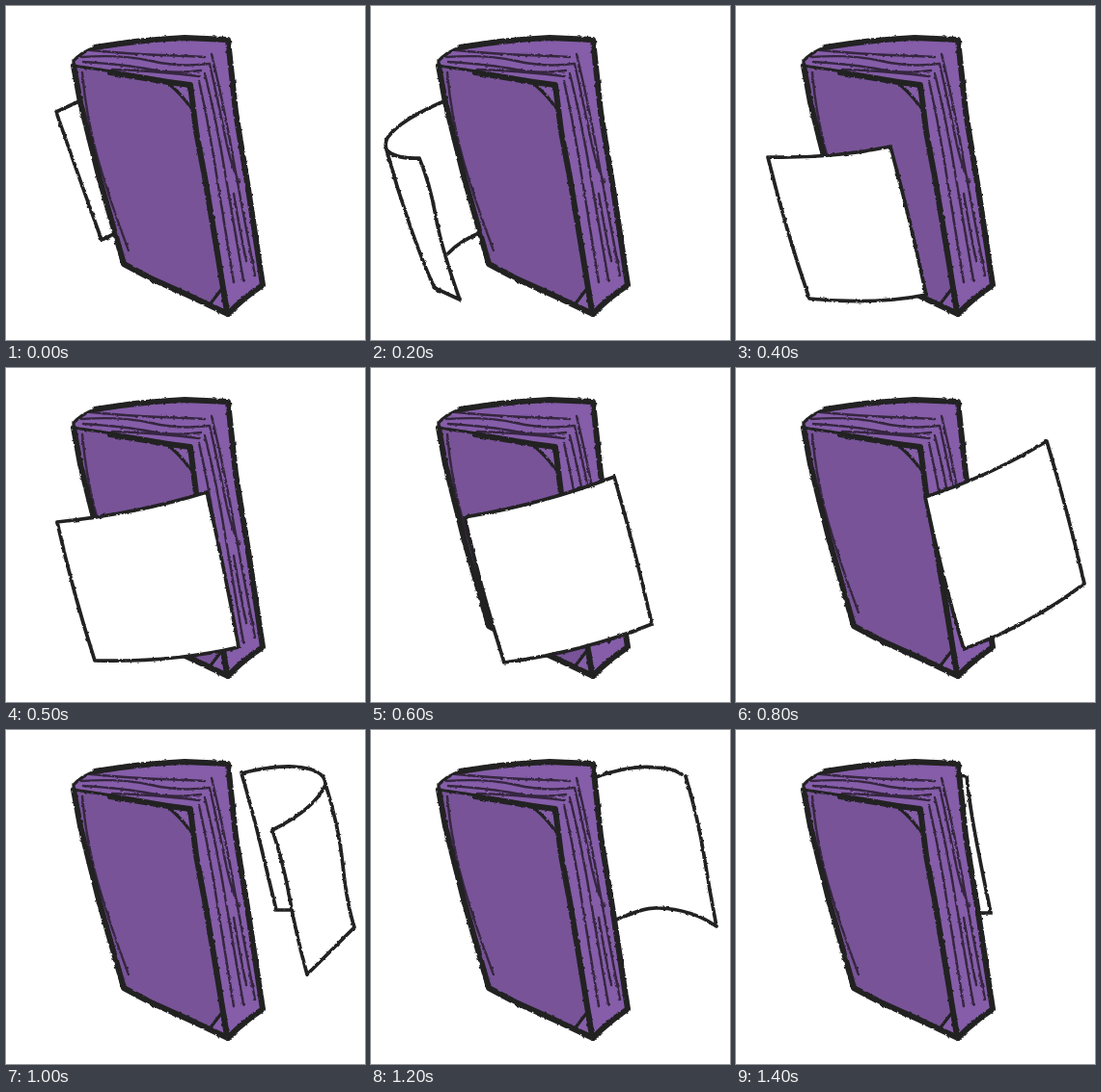
Animation, 372 px wide and 347 px high, one loop 1500 ms. Source, as an HTML page:

```html
<!DOCTYPE html>
<html lang="en">
<head>
<meta charset="utf-8">
<title>Page around a book</title>
<style>
  html, body { margin: 0; width: 100%; height: 100%; overflow: hidden; background: #fff; }
  svg { display: block; width: 372px; height: 347px; }
  path { stroke: #222; stroke-linecap: round; stroke-linejoin: round; fill: none; }
  .side { fill: #855da9; stroke: none; }
  .cover { fill: #785398; stroke: none; }
  .bold { stroke-width: 6; }
  .mid { stroke-width: 3.2; }
  .thin { stroke-width: 2.4; stroke: #35263f; }
  .pose {
    fill: #fff;
    stroke-width: 3.7;
    visibility: hidden;
    animation: show 1.5s step-end infinite;
    /* 1 ms early, so each pose is settled on its tick */
    animation-delay: calc(var(--i) * 100ms - 1501ms);
  }
  @keyframes show {
    0% { visibility: visible; }
    6.666%, 100% { visibility: hidden; }
  }
</style>
</head>
<body>
<svg viewBox="0 0 372 347">
  <defs>
    <filter id="rough" filterUnits="userSpaceOnUse" x="0" y="0" width="372" height="347" color-interpolation-filters="sRGB">
      <feTurbulence type="fractalNoise" baseFrequency=".22" numOctaves="2" seed="4" result="grain"/>
      <feDisplacementMap in="SourceGraphic" in2="grain" scale="2.6" xChannelSelector="R" yChannelSelector="G"/>
    </filter>
  </defs>

  <g id="behind" filter="url(#rough)"></g>

  <g filter="url(#rough)">
    <path class="side" d="M70 62L69 57Q78 47 92 43 140 35 185 33L230 35 238 110 251 190 266 290 230 320 122 268Z"/>
    <path class="cover" d="M70 62L110 68 168 80 191 82 197 130 206 178 218 250 230 320 190 301 150 283 122 268 113 236 97 180 77 100Z"/>
    <path class="side" d="M170 82L192 82 192 105ZM212 309L225 292 230 318Z"/>

    <path class="thin" d="M88 46Q130 50 160 51T206 53M78 53Q120 50 150 57T210 60M80 58Q125 61 150 66T202 67M110 66Q150 67 200 73"/>
    <path class="thin" d="M200 78Q208 113 214 150T236 287M206 70Q216 110 223 150T246 285M211 60Q220 100 227 135T242 183M213 50Q225 100 233 145T258 280M236 195Q242 232 249 265"/>
    <path class="thin" d="M79 69Q83 115 95 158T127 254"/>
    <path class="mid" d="M170 82Q182 92 191 105M212 309L225 292"/>

    <path class="bold" d="M70 62L77 100 97 180 113 236 122 268 150 283 190 301 230 320"/>
    <path class="bold" d="M92 43Q140 35 185 33L230 35 238 110 251 190 266 290Q246 303 230 320"/>
    <path class="mid" d="M70 61L70 57Q78 48 92 43M70 62L110 68"/>
    <path class="bold" d="M108 69L168 79 191 82 197 130 206 178 218 250 229 318"/>
  </g>

  <g id="front" filter="url(#rough)"></g>
</svg>
<script>
  const sheet = (tl, tr, br, bl) => {
    // four corners, with slightly bowed edges
    const bow = (a, b, dx, dy) =>
      `Q${(a[0] + b[0]) / 2 + dx} ${(a[1] + b[1]) / 2 + dy} ${b[0]} ${b[1]}`;
    return `M${tl[0]} ${tl[1]}` + bow(tl, tr, 5, 7) + bow(tr, br, 2, -2) +
      bow(br, bl, 6, 9) + bow(bl, tl, -3, 2) + 'Z';
  };

  const poses = [
    ['behind', 'M78 98L52 110Q71 165 99 243L116 235'],
    ['behind', 'M78 97Q44 110 31 124Q34 160 49 205T77 282Q92 262 115 236'],
    ['behind', 'M78 98Q30 118 17 137Q14 143 16 149Q27 190 41 230T66 293L92 305M16 149Q24 159 50 158Q61 184 67 218T92 305M80 257Q92 244 114 235'],
    ['front', 'M73 103Q34 120 20 145Q24 185 38 227T66 297Q100 306 146 301Q132 260 124 223T106 158Q60 168 20 148'],
    ['front', sheet([33, 157], [160, 146], [197, 300], [76, 304])],
    ['front', sheet([53, 160], [208, 129], [241, 290], [92, 304])],
    ['front', sheet([97, 155], [252, 113], [291, 266], [138, 306])],
    ['front', sheet([154, 146], [295, 91], [340, 236], [192, 302])],
    ['front', sheet([196, 134], [322, 76], [361, 224], [236, 292])],
    ['front', 'M332 62Q310 46 282 54L268 100M332 62Q294 98 240 116Q248 160 258 198T277 276Q330 252 363 213Q355 170 348 130T332 62'],
    ['behind', 'M295 187L280 187Q272 154 264 120T244 45Q275 37 298 38Q330 40 331 56Q345 100 349 140T361 205Q334 232 312 254Q300 210 294 175T276 104Q320 82 331 57'],
    ['behind', 'M230 48Q270 35 304 39Q329 41 329 50Q345 95 349 140T360 205L336 226Q325 180 320 150T305 88Q324 69 329 50M328 191Q286 183 252 196'],
    ['behind', 'M230 50Q268 36 295 39Q312 39 322 46M326 48Q339 92 345 130T358 204Q332 186 298 185Q283 184 252 198'],
    ['behind', 'M228 50Q260 41 286 48Q298 86 302 124T316 198Q288 184 250 193'],
    ['behind', 'M228 47L239 48Q242 78 249 115T264 190L250 190']
  ];

  poses.forEach(([layer, d], i) => {
    const p = document.createElementNS('http://www.w3.org/2000/svg', 'path');
    p.setAttribute('class', 'pose');
    p.setAttribute('d', d);
    p.style.setProperty('--i', i);
    document.getElementById(layer).append(p);
  });
</script>
</body>
</html>
```
